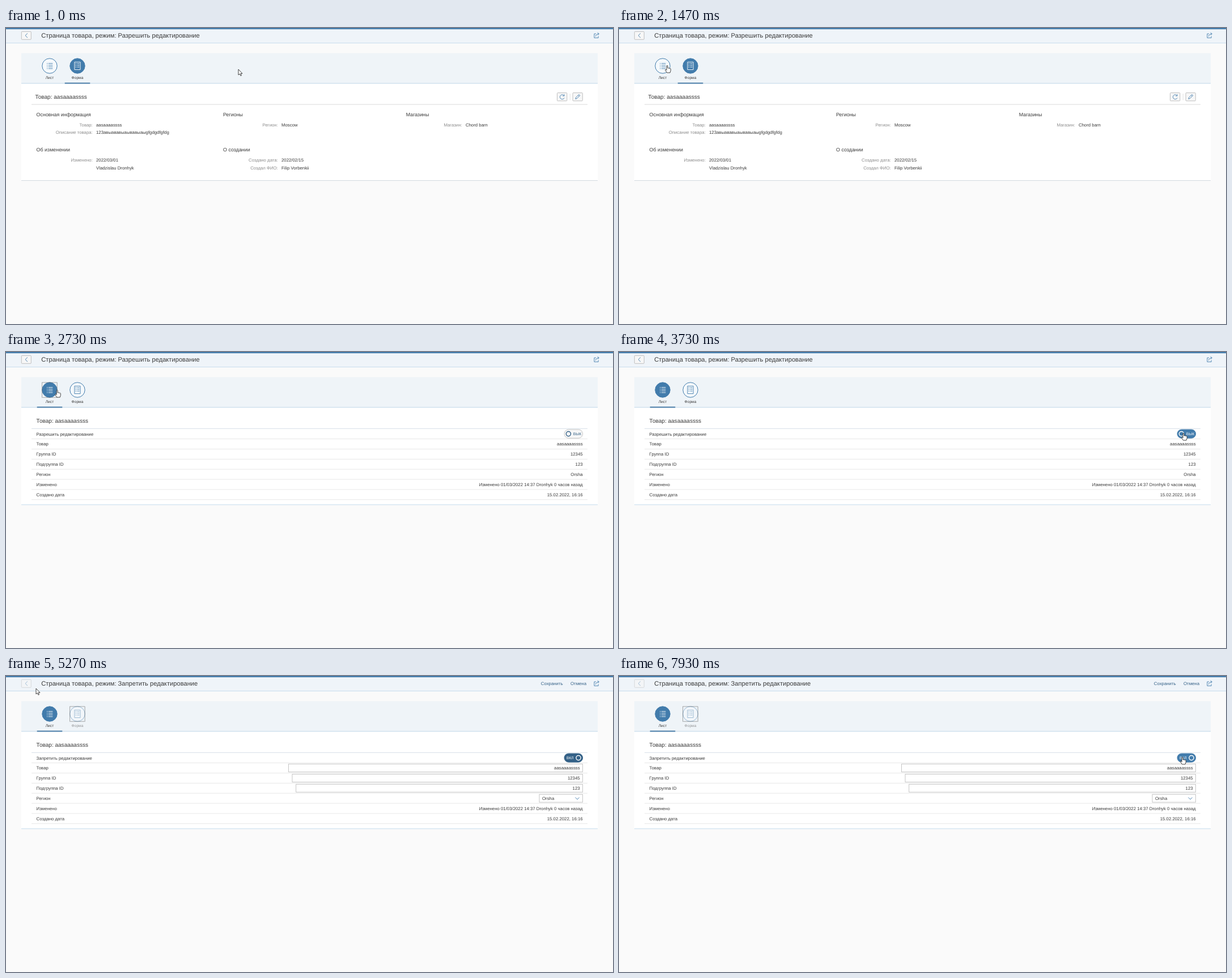
Recreate the animation shown at these times as an HTML page. Size 1071 by 523 pixels, loop 8000 ms.

```html
<!DOCTYPE html>
<html lang="ru">
<head>
<meta charset="utf-8">
<title>Страница товара</title>
<style>
html, body { margin: 0; width: 100%; height: 100%; overflow: hidden; background: #fafafa; }
svg { display: block; width: 1071px; height: 523px; font: 7.81px "Liberation Sans", Arial, sans-serif; text-rendering: geometricPrecision; }
text { fill: #3a3a3a; white-space: pre; }
.title { font-size: 11.16px; }
.head { font-size: 10.04px; }
.sub { font-size: 8.92px; }
.small { font-size: 6.69px; }
.label { fill: #8c8c8c; }
.link { fill: #346187; }
.end { text-anchor: end; }
.mid { text-anchor: middle; }
.icon { fill: none; stroke: #427cac; stroke-width: .9; }
.btn { fill: #f7f7f7; stroke: #b8b8b8; stroke-width: .9; }
.field { fill: #fff; stroke: #bfbfbf; stroke-width: .9; }
.focus { fill: none; stroke: #444; stroke-width: .8; stroke-dasharray: 1 .8; }
.tab { color: #427cac; }
.tab circle { fill: #f5f9fc; stroke: #427cac; stroke-width: 1; }
.tab path { fill: none; stroke: currentColor; stroke-width: .9; }
.tab .bar { fill: none; }
.tab.on { color: #fff; }
.tab.on circle { fill: #427cac; }
.tab.on .bar { fill: #3d73a1; }
.off { opacity: .5; }
#pill { stroke-width: .9; }
#arrow, #hand { fill: #fff; stroke: #222; stroke-width: .85; stroke-linejoin: round; }
</style>
</head>
<body>
<svg viewBox="0 0 1071 523" id="stage"></svg>
<script>
const text = (x, y, s, cls = '') => `<text x="${x}" y="${y}" class="${cls}">${s}</text>`;
const rect = (x, y, w, h, attrs) => `<rect x="${x}" y="${y}" width="${w}" height="${h}" ${attrs}/>`;
const path = (d, cls = 'icon') => `<path d="${d}" class="${cls}"/>`;
const focus = (id, x, y, w, h) => rect(x, y, w, h, `id="${id}" class="focus"`);

const tab = (id, x, label, icon) => `<g id="${id}" class="tab">
  <circle cx="${x}" cy="67" r="13.2"/>${path(icon, '')}
  ${text(x, 90, label, 'small mid')}${rect(x - 22.3, 96.6, 44.6, 1.8, 'class="bar"')}</g>`;

const listIcon = [62.5, 65.6, 68.7, 71.8].map(y => `M72 ${y}h1.4m1.4 0h7.6`).join('');
const formIcon = 'M120.9 60.2h10.2v13.4h-10.2z' +
  [63, 66, 69].map(y => `M122.5 ${y}h1.8m1.2 0h4`).join('');

const pair = (x, y, label, value) =>
  text(x, y, label, 'label end') + text(x + 6.2, y, value);

const form = `<g id="form">
  ${text(51.4, 125.2, 'Товар: aasaaaassss', 'head')}
  ${rect(45, 134.6, 981, .9, 'fill="#d6d6d6"')}
  ${rect(972.5, 114.5, 17.3, 14.3, 'rx="1" class="btn"')}
  ${path('M984.6 119.5A4 4 0 1 0 985 123.5M985 117.2v2.8h-2.8')}
  ${rect(994.8, 116, .8, 11.5, 'fill="#d9d9d9"')}
  ${rect(1000, 114.5, 17.3, 14.3, 'rx="1" class="btn"')}
  ${path('M1004.8 125.4l.8-2.7 5.3-5.3 1.8 1.8-5.3 5.3zM1009.5 118.8l1.8 1.8')}
  ${text(53.6, 156, 'Основная информация', 'sub')}
  ${text(383, 156, 'Регионы', 'sub')}
  ${text(705.7, 156, 'Магазины', 'sub')}
  ${text(53.6, 218.4, 'Об изменении', 'sub')}
  ${text(383, 218.4, 'О создании', 'sub')}
  ${pair(152.8, 173.7, 'Товар:', 'aasaaaassss')}
  ${pair(152.8, 187, 'Описание товара:', '123авыававыаывавыаыgfgdgdfgfdg')}
  ${pair(479.8, 173.7, 'Регион:', 'Moscow')}
  ${pair(804.7, 173.7, 'Магазин:', 'Chord barn')}
  ${pair(152.8, 236.2, 'Изменено:', '2022/03/01')}
  ${pair(152.8, 249.6, '', 'Vladzislau Dronhyk')}
  ${pair(479.8, 236.2, 'Создано дата:', '2022/02/15')}
  ${pair(479.8, 249.6, 'Создал ФИО:', 'Filip Vorbenkii')}
  ${rect(27, 269, 1017, 1, 'fill="#d3dae0"')}
</g>`;

const rows = [
  ['Разрешить редактирование', ''],
  ['Товар', 'aasaaaassss', 498.5],
  ['Группа ID', '12345', 505],
  ['Подгруппа ID', '123', 511.7],
  ['Регион', 'Orsha', 941],
  ['Изменено', 'Изменено 01/03/2022 14:37 Dronhyk 0 часов назад'],
  ['Создано дата', '15.02.2022, 16:16'],
];
const rowY = i => 147.6 + i * 17.87;
const plain = rows.map(([, value, left], i) =>
  left ? text(1017.6, rowY(i), value, 'end') : '').join('');
const fields = rows.map(([, value, left], i) => !left ? '' :
  rect(left, rowY(i) - 9.9, 1017.4 - left, 13.9, 'class="field"') +
  (i == 4 ? text(946, rowY(i), value) : text(1012.6, rowY(i), value, 'end'))).join('');

const list = `<g id="list">
  ${text(53.6, 125.2, 'Товар: aasaaaassss', 'head')}
  ${rect(45, 134.8, 981, .9, 'fill="#d0dbe4"')}
  ${rows.map(([label, value, left], i) =>
    text(53.6, rowY(i), label, i ? '' : 'mode') +
    (left ? '' : text(1017.6, rowY(i), value, 'end')) +
    rect(45, rowY(i) + 5.5, 981, .9, 'fill="#e5e5e5"')).join('')}
  <g id="plain">${plain}</g>
  <g id="fields">${fields}${path('M1004.5 214.5l3.5 3.6 3.5-3.6', 'icon gray')}</g>
  ${rect(985, 137, 32.6, 15.2, 'rx="7.6" id="pill"')}
  <text id="state" y="147.1" class="small"></text>
  <circle id="knob" cy="144.6" r="4.1" fill="none" stroke-width="1.4"/>
  ${rect(27, 269.2, 1017, 1.2, 'fill="#cfe2f0"')}
</g>`;

stage.innerHTML = `
  ${rect(0, 0, 1071, 27, 'fill="#eff4f9"')}
  ${rect(0, 0, 1071, 2.2, 'fill="#427cac"')}
  ${rect(0, 26, 1071, 1.1, 'fill="#cbdfee"')}
  <g id="back">${rect(27.3, 6.3, 17, 14, 'rx="1" class="btn"')}${path('M38 9.4l-4 3.9 4 3.9')}</g>
  <text id="title" x="62.3" y="17" class="title"></text>
  <g id="actions">${text(943.8, 16.2, 'Сохранить', 'link')}${text(996, 16.2, 'Отмена', 'link')}</g>
  ${path('M1041 10.2h-3.1v7.2h7.2v-3M1040.4 15q.4-4.2 5.4-4.7M1043.6 8.2l2.8 2.1-2.6 2.3')}
  ${focus('headFocus', .5, 3.4, 1070, 22.6)}
  ${rect(27, 98, 1017, 172, 'fill="#fff"')}
  ${rect(27, 44.5, 1017, 53.5, 'fill="#eff4f8"')}
  ${rect(27, 97.2, 1017, 1.2, 'fill="#c9ddec"')}
  ${tab('listTab', 77, 'Лист', listIcon)}
  ${tab('formTab', 126, 'Форма', formIcon)}
  ${focus('listFocus', 63.6, 53.9, 26.6, 26.4)}
  ${focus('formFocus', 112.6, 53.9, 26.6, 26.4)}
  ${form}${list}
  <path id="arrow" d="M0 0V10L2.3 8L4 11.5L5.5 10.8L4 7.4H7Z"/>
  <path id="hand" d="M-1 1Q0-.5 1 1V5q1-.8 1.8.2q1-.6 1.7.3q1.3-.5 1.7.8V9.5L5 13H-.5L-3.4 8.5q0-1.4 1.4-1L-1 8.6Z"/>`;

// Pointer stops: time, x, y
const stops = [
  [67, 410, 73], [530, 742, 104], [930, 282, 70], [1330, 85, 66], [1470, 85, 66],
  [1930, 124, 62], [2070, 124, 62], [2530, 78, 66], [2670, 78, 66], [3600, 996, 143],
  [3740, 996, 143], [4600, 995, 143], [4867, 99, 64], [4933, 127, 67], [5070, 127, 67],
  [5267, 53, 22], [5530, 34, 12], [5800, 34, 12], [6330, 129, 65], [6720, 129, 65],
  [7530, 948, 125], [7933, 994, 143],
];

function pointer(t) {
  const i = stops.findIndex(s => s[0] > t);
  if (i < 1) return stops.at(i).slice(1);
  const [t0, x0, y0] = stops[i - 1], [t1, x1, y1] = stops[i];
  const u = (t - t0) / (t1 - t0), k = u * u * (3 - 2 * u);
  return [x0 + (x1 - x0) * k, y0 + (y1 - y0) * k];
}

const $ = id => document.getElementById(id);
const show = (id, on) => $(id).style.display = on ? '' : 'none';
const set = (id, attrs) => Object.entries(attrs).forEach(([k, v]) => $(id).setAttribute(k, v));
const STEP = 1000 / 15;

function draw(now) {
  const t = Math.floor((now % 8000 + 4) / STEP) * STEP;
  const within = (a, b) => t >= a && t < b;
  const isList = within(1530, 2066) || t >= 2530;
  const edit = t >= 3790;
  const [x, y] = pointer(t < 67 ? 0 : t);
  const onToggle = isList && x > 984 && x < 1018 && y > 136 && y < 153;
  const onTab = y > 52 && y < 98 && (Math.abs(x - 77) < 22 || !edit && Math.abs(x - 126) < 22);
  const mode = (edit ? 'Запретить' : 'Разрешить') + ' редактирование';

  show('form', !isList);
  show('list', isList);
  show('plain', !edit);
  show('fields', edit);
  show('actions', edit);
  $('title').textContent = 'Страница товара, режим: ' + mode;
  document.querySelector('.mode').textContent = mode;
  $('back').classList.toggle('off', edit);
  $('listTab').classList.toggle('on', isList);
  $('formTab').classList.toggle('on', !isList);
  $('formTab').classList.toggle('off', edit);

  show('listFocus', within(1530, 2066) || within(2530, 3730));
  show('formFocus', within(2066, 2530) || within(4930, 5660) || t >= 6330);
  show('headFocus', within(5660, 6330));

  const filled = edit || onToggle;
  const ink = filled ? '#fff' : '#346187';
  const fill = onToggle ? '#427cac' : edit ? '#346187' : '#f7f7f7';
  set('pill', { fill, stroke: filled ? fill : '#bfbfbf' });
  set('state', { x: edit ? 989 : 1000.8, style: 'fill:' + ink });
  set('knob', { cx: edit ? 1010 : 992.4, stroke: ink });
  $('state').textContent = edit ? 'ВКЛ' : 'ВЫК';

  const hand = onToggle || onTab;
  show('hand', hand);
  show('arrow', !hand);
  set(hand ? 'hand' : 'arrow', { transform: `translate(${x} ${y})` });
}

let start;
function loop(now) {
  start ??= now;
  draw(now - start);
  requestAnimationFrame(loop);
}
draw(0);
requestAnimationFrame(loop);
</script>
</body>
</html>
```
